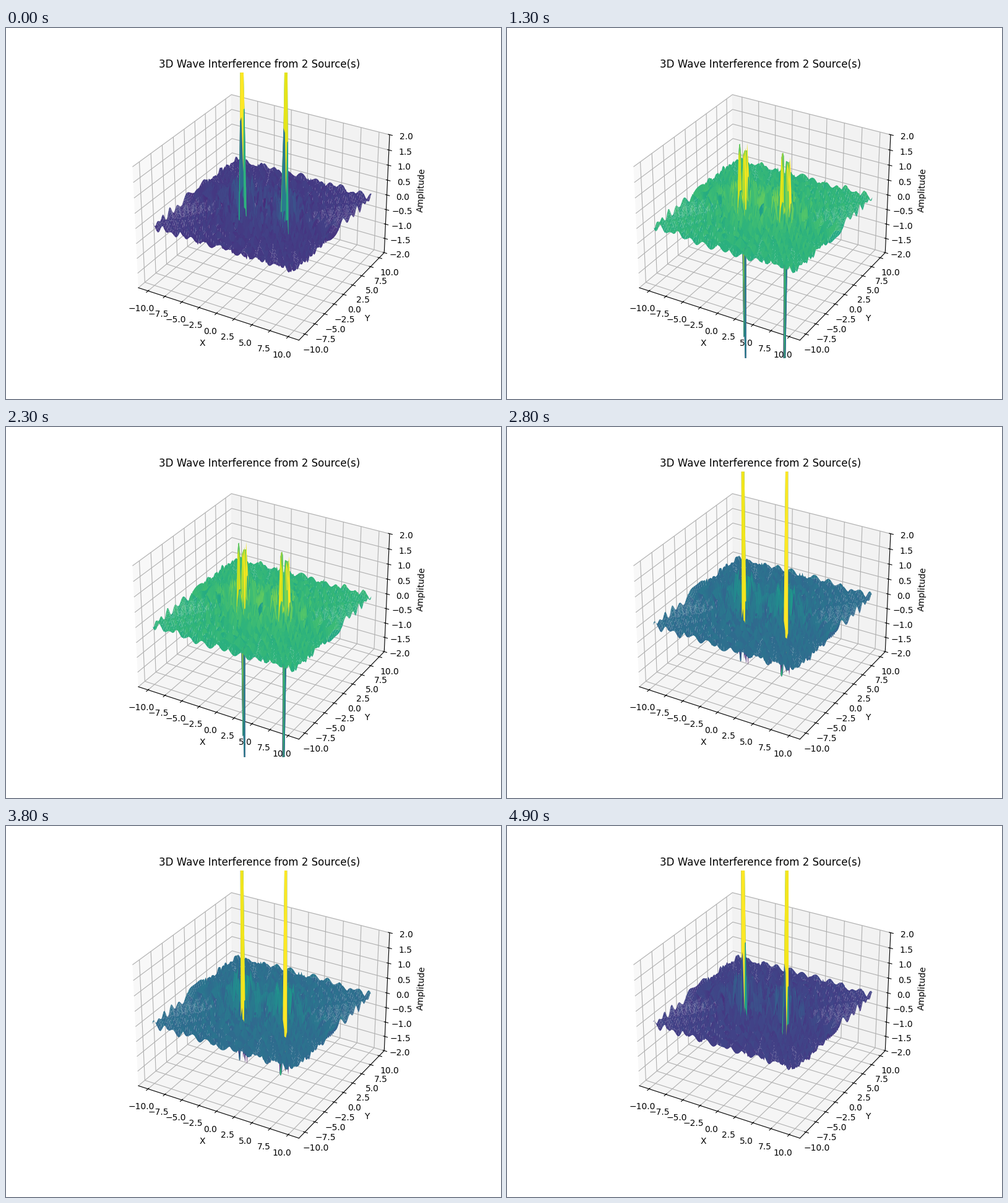
A matplotlib script that plays this animation: 800 by 600 pixels, repeating every 5 s.

```python
import numpy as np
import matplotlib.pyplot as plt
from matplotlib.animation import FuncAnimation

FRAMES, INTERVAL = 50, 100
WAVELENGTH, FREQUENCY, AMPLITUDE = 1.0, 1.0, 1.0
SOURCES = [(-3, 0), (3, 0)]
PERIOD = round(1000 / (FREQUENCY * INTERVAL))  # frames per wave cycle

axis = np.linspace(-10, 10, 100)
X, Y = np.meshgrid(axis, axis)


def wave_field(t):
    """Sum of the circular waves, each fading with distance."""
    total = np.zeros_like(X)
    for sx, sy in SOURCES:
        r = np.hypot(X - sx, Y - sy) + 1e-6
        phase = 2 * np.pi * (r / WAVELENGTH - FREQUENCY * t)
        total += AMPLITUDE * np.sin(phase) / r
    return total


fig = plt.figure(figsize=(8, 6), dpi=100)
ax = fig.add_subplot(111, projection="3d")

# One surface per step of the cycle; each frame shows just one of them.
surfaces = [
    ax.plot_surface(X, Y, wave_field(step * INTERVAL / 1000),
                    cmap="viridis", edgecolor="none")
    for step in range(PERIOD)
]

ax.set_zlim(-2, 2)
ax.set_xlabel("X")
ax.set_ylabel("Y")
ax.set_zlabel("Amplitude")
ax.set_title(f"3D Wave Interference from {len(SOURCES)} Source(s)")


def update(frame):
    for step, surface in enumerate(surfaces):
        surface.set_visible(step == frame % PERIOD)
    return surfaces


anim = FuncAnimation(fig, update, frames=FRAMES, interval=INTERVAL,
                     init_func=lambda: update(0), repeat=True,
                     repeat_delay=0, blit=False)
plt.show()
```
